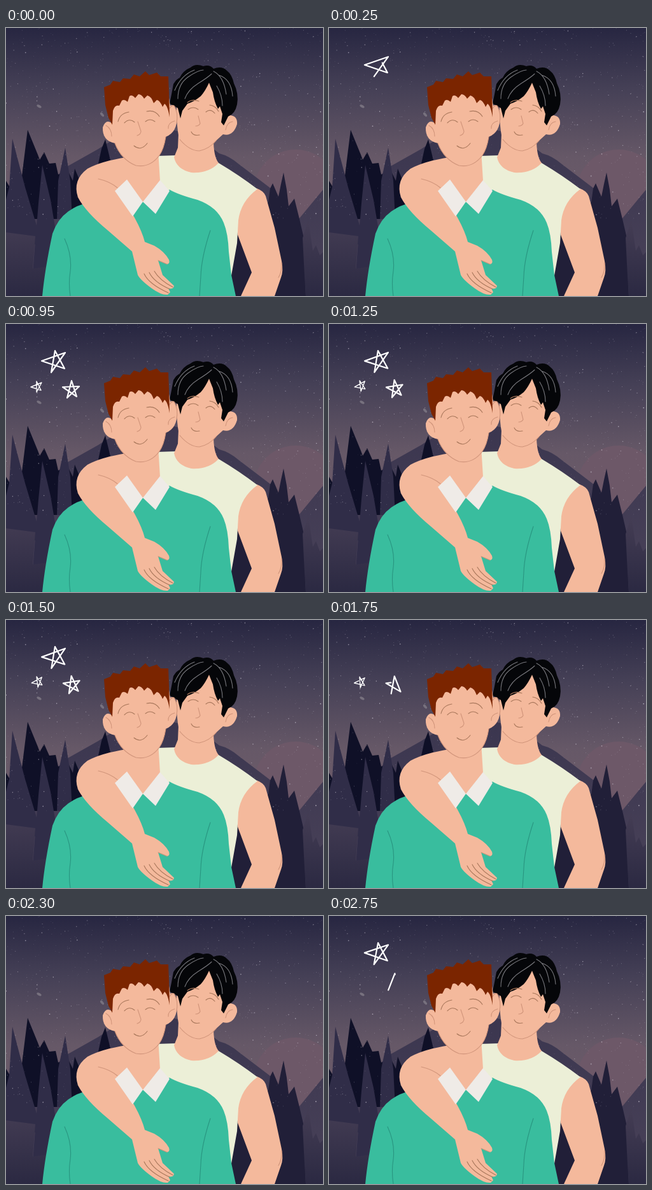
An HTML page for the animation above (2.8 s loop, 498 px wide and 421 px high).

```html
<!DOCTYPE html>
<html lang="en">
<head>
<meta charset="utf-8">
<title>Starry embrace</title>
<style>
html, body { margin: 0; width: 100%; height: 100%; overflow: hidden; background: #292741; }
svg { display: block; width: 498px; height: 421px; }
.skin { fill: #f4b99c; }
.shirt { fill: #ecefd7; }
.sweater { fill: #39bd9e; }
.collar { fill: #efebe7; }
.line, .fold, .crease, .strand { fill: none; stroke-width: 1.1; stroke-linecap: round; }
.line { stroke: #a9775b; }
.fold { stroke: #299580; }
.crease { stroke: #d0947a; }
.strand { stroke: #77777c; }
#doodles path { fill: none; stroke: #fff; stroke-linejoin: round; stroke-linecap: round; }
</style>
</head>
<body>
<svg viewBox="0 0 498 421">
  <defs>
    <linearGradient id="sky" x1="0" y1="0" x2="0" y2="270" gradientUnits="userSpaceOnUse">
      <stop offset="0" stop-color="#272641"/>
      <stop offset=".35" stop-color="#454056"/>
      <stop offset=".75" stop-color="#665867"/>
      <stop offset="1" stop-color="#6b5b69"/>
    </linearGradient>
    <linearGradient id="hill" x1="0" y1="160" x2="0" y2="400" gradientUnits="userSpaceOnUse">
      <stop offset="0" stop-color="#3b364f"/>
      <stop offset="1" stop-color="#484158"/>
    </linearGradient>
    <linearGradient id="ground" x1="0" y1="310" x2="0" y2="421" gradientUnits="userSpaceOnUse">
      <stop offset="0" stop-color="#433c53"/>
      <stop offset="1" stop-color="#2b2942"/>
    </linearGradient>
  </defs>

  <!-- Landscape -->
  <path fill="url(#sky)" d="M0 0H498V421H0Z"/>
  <circle cx="455" cy="257" r="66" fill="#6d5868"/>
  <path fill="url(#hill)" d="M0 250L60 250L97 217L145 190Q244 122 335 197Q351 201 366 214L416 252L440 300H460L498 254V421H0Z"/>
  <path fill="#0f1027" d="M0 240L6 250L25 232L34 160L50 199L53 207L60 195L68 213L78 212L82 230L98 226L105 240L108 221L116 240L125 300H0ZM145 213L150 190L156 175L164 208V225H145Z"/>
  <path fill="#302d48" d="M0 270L5 250L10 174L30 250L48 310V340H0ZM42 385L51 275L57 215L70 270L80 330L90 385ZM82 240L93 188L101 240L104 300H80Z"/>
  <path fill="url(#ground)" d="M0 321L46 327L42 378L100 370V421H0Z"/>
  <path fill="#211f38" d="M340 330L412 274L415 252L419 244L428 265L432 245L436 227L441 254L444 280L453 268L461 300L467 326L471 421H340Z"/>
  <path fill="url(#ground)" d="M469 390L466 330L475 302L482 350L487 341L493 357L498 352V421H471Z"/>

  <g id="specks" fill="#d9d4df"></g>
  <g fill="#77717e"><ellipse cx="52" cy="123" rx="4" ry="2" transform="rotate(30 52 123)"/><ellipse cx="151" cy="136" rx="4" ry="2" transform="rotate(50 151 136)"/></g>

  <!-- Dark-haired figure -->
  <path class="skin" d="M394 252Q405 256 408 264L422 314L433 366Q436 382 432 392L422 421H369L386 384L364 325L360 280Z"/>
  <path class="crease" d="M433 369Q434 382 428 392"/>
  <path class="shirt" d="M236 201L268 200L334 212Q366 231 395 253Q369 272 365 302L363 338L354 389L335 360L235 300Z"/>
  <path class="skin" d="M271 165L270 188L264 203Q268 222 291 227Q318 229 334 212Q326 202 326 175Z"/>
  <path class="skin" d="M268 118Q267 150 272 174Q288 193 303 193Q321 190 331 176L341 167Q357 171 363 151Q364 137 350 137L341 148L337 90L318 78L290 100Z"/>
  <path class="crease" d="M273 175Q288 193 304 193Q319 190 330 177M345 160Q347 148 356 147"/>
  <path fill="#050609" d="M257 119L260 104L263 88Q268 80 273 78Q278 67 290 62Q298 55 310 60Q320 57 326 64Q339 59 347 67Q355 73 358 87Q366 103 363 120Q360 135 349 139L342 153L338 148L340 135L336 123L333 127Q327 116 325 101L319 86Q313 99 306 107Q295 116 285 119L277 130L274 142L270 126L264 122Z"/>
  <path class="strand" d="M270 111Q270 88 286 77T310 66M281 111Q286 97 302 87T323 72M326 68Q342 76 346 104M334 74Q354 80 356 107M265 98Q275 74 296 66M331 91Q340 106 340 122"/>
  <path class="line" d="M285 117Q293 111 303 115M320 121Q329 122 334 131M286 128Q294 122 302 128M314 132Q321 126 328 134M291 163Q294 170 304 168"/>
  <path class="crease" d="M302 138L305 150Q303 154 298 154"/>

  <!-- Red-haired figure -->
  <path class="sweater" d="M57 421Q61 379 73 323Q81 300 98 288Q112 278 130 274L180 254L215 273L257 254Q271 262 301 270Q332 281 342 306Q349 323 350 352L354 388L361 421Z"/>
  <path class="fold" d="M92 331Q104 357 101 382Q98 401 101 421M321 318Q307 360 306 390L304 421"/>
  <path class="skin" d="M190 203Q150 209 128 221Q104 239 113 266Q125 289 160 318L198 351L207 388Q211 396 229 409Q244 420 254 419L258 415L255 409Q263 411 264 405L246 388L239 365L253 371Q258 370 256 364Q249 351 233 342L218 336Q214 320 202 298L178 256L193 235Z"/>
  <path class="crease" d="M145 237Q163 241 175 251M239 365L253 371"/>
  <path class="line" d="M217 386Q224 402 255 416M225 384Q232 399 257 410M233 382Q241 396 262 407"/>
  <path class="skin" d="M190 198V240L215 274L242 240L239 192Z"/>
  <path class="collar" d="M190 238L171 256L199 296L215 273ZM242 239L257 256L235 292L215 273Z"/>
  <path class="skin" d="M167 112V150Q157 142 152 156Q151 177 171 181Q181 207 204 216Q226 220 241 200Q248 190 251 171Q269 164 269 139Q267 117 258 122L254 98L215 92Z"/>
  <path class="crease" d="M171 181Q181 207 204 216Q226 220 241 200Q248 190 251 171M257 127Q259 121 264 122Q271 134 268 149M157 153Q166 158 166 170M265 146Q254 149 255 158"/>
  <path fill="#7b2500" d="M154 93L164 89L168 83L179 85L184 79L195 80L201 73L210 76L219 68L225 74L237 70L243 76L255 76L256 103L257 140Q254 122 249 119L246 124Q242 114 237 113L232 118Q228 107 222 106L217 111Q213 104 208 104L203 110Q198 104 194 107L191 116Q186 111 182 114L178 122Q171 120 168 130L167 152L161 141L156 121Z"/>
  <path class="line" d="M176 147Q179 134 193 132M221 131Q234 128 241 139M186 149Q194 141 202 148M219 147Q226 141 234 147M201 185Q212 194 222 181"/>
  <path class="crease" d="M207 147L212 162Q212 167 206 169"/>

  <g id="doodles"></g>
</svg>
<script>
const NS = 'http://www.w3.org/2000/svg';
const LOOP = 2800, CYCLE = 2400, STEP = 50, POSE = 150;

function add(parent, tag, attrs) {
  const node = document.createElementNS(NS, tag);
  for (const key in attrs) node.setAttribute(key, attrs[key]);
  return parent.appendChild(node);
}

let seed = 41;
const random = () => (seed = seed * 16807 % 2147483647) / 2147483647;
const specks = document.getElementById('specks');
for (let i = 0; i < 850; i++) {
  add(specks, 'circle', {
    cx: (random() * 498).toFixed(1), cy: (random() * 300).toFixed(1),
    r: (0.35 + random() ** 4 * 0.55).toFixed(2), opacity: (0.2 + random() * 0.5).toFixed(2)
  });
}

// Each star is one pen stroke, drawn in and later pulled back, swaying by a few degrees.
const stars = [
  { d: 'M71 76L93 45L56 58L92 70L77 42L71 76', cx: 76, cy: 58, width: 2.2, sway: 0.8, draw: [60, 320], erase: [1580, 1750] },
  { d: 'M96 116L103 89L111 114L89 99L115 98L96 116', cx: 102, cy: 102, width: 2.2, sway: 8, draw: [320, 455], erase: [1700, 1850] },
  { d: 'M48 107L56 92L39 99L55 104L48 90L48 107', cx: 48, cy: 99, width: 1.4, sway: 8, draw: [410, 530], erase: [1890, 2040] }
];
const doodles = document.getElementById('doodles');
for (const star of stars) {
  star.path = add(doodles, 'path', { d: star.d, pathLength: 1, 'stroke-width': star.width });
}

const ramp = (t, [from, to]) => Math.min(1, Math.max(0, (t - from) / (to - from)));

function render(now) {
  const t = Math.floor(now % LOOP / STEP) * STEP;
  const phase = t % CYCLE;
  const swing = Math.sin(Math.floor(phase / POSE) * Math.PI / 6);
  for (const { path, cx, cy, sway, draw, erase } of stars) {
    const shown = ramp(phase, draw) - ramp(phase, erase);
    const turn = sway * swing, drift = turn * 0.17;
    path.style.visibility = shown > 0 ? 'visible' : 'hidden';
    path.setAttribute('stroke-dasharray', `${shown} 2`);
    path.setAttribute('transform', `translate(${-drift} ${drift}) rotate(${turn} ${cx} ${cy})`);
  }
}

const start = performance.now();
function tick() {
  render(performance.now() - start);
  requestAnimationFrame(tick);
}
tick();
</script>
</body>
</html>
```
